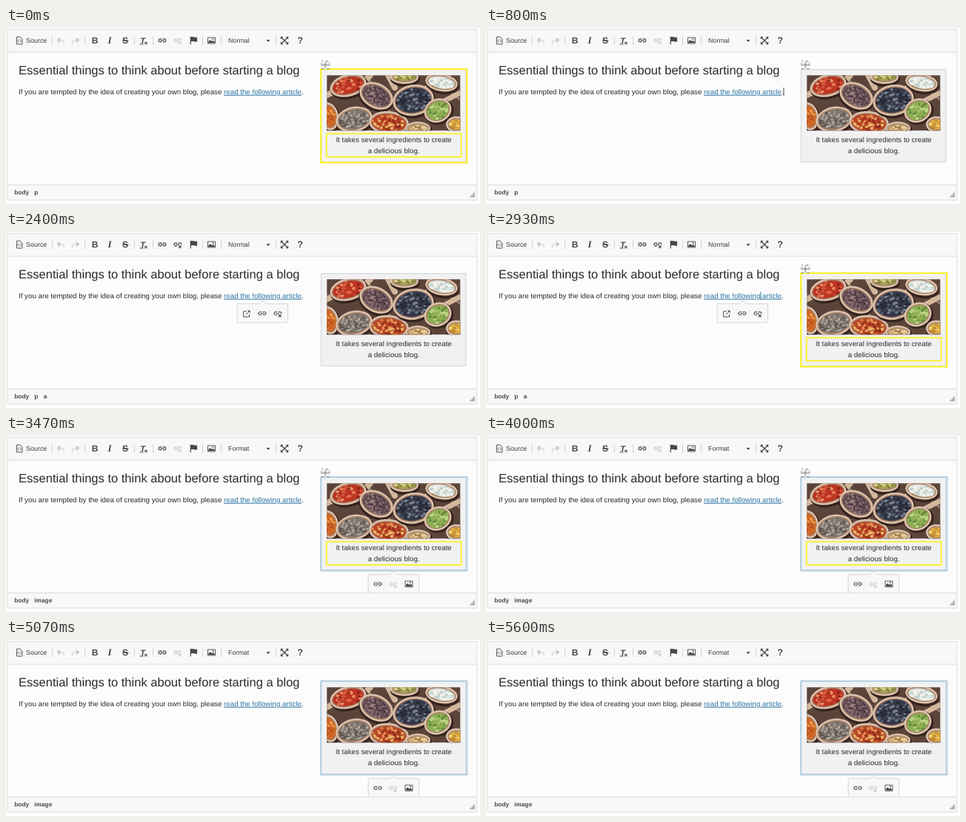
Write an HTML page that moves like this. It is 640 by 239 pixels and loops after 5670 ms.

```html
<!DOCTYPE html>
<html lang="en">
<head>
<meta charset="utf-8">
<title>Editor demo</title>
<style>
html, body { margin: 0; width: 100%; height: 100%; overflow: hidden; background: #fff; }
svg { display: block; width: 640px; height: 239px; }
text { font-family: "Liberation Sans", Arial, sans-serif; fill: #2b2b2d; text-rendering: geometricPrecision; white-space: pre; }
.title { font-size: 16.54px; }
.copy { font-size: 9.74px; }
.ui { font-size: 8.95px; fill: #3c3c3e; }
.path { font-size: 8.3px; font-weight: bold; fill: #484848; }
.link { fill: #2f78a3; text-decoration: underline; text-decoration-thickness: .8px; }
.mid { text-anchor: middle; }
.icon { color: #464648; }
.off { color: #c8c8ca; }
.line { fill: none; stroke: currentColor; stroke-width: 1.2; }
.thin { fill: none; stroke: currentColor; stroke-width: .9; }
.fill, .icon text { fill: currentColor; }
</style>
</head>
<body>
<svg viewBox="0 0 640 239">
  <defs>
    <clipPath id="photoClip"><path d="M433.3 64.3h180v75h-180z"/></clipPath>
    <g id="doc">
      <path class="thin" d="M-3.5-5H1.2L4-2.2V5H-3.5z"/>
      <path class="thin" d="M-.7-1.5L-2 .5-.7 2.5M1.2-1.5L2.5.5 1.2 2.5"/>
    </g>
    <g id="undo">
      <path class="fill" d="M-5.5-.5L-1-4.4V3.4z"/>
      <path class="line" d="M-1.5-.7C2-.9 4-.2 4.6 4"/>
    </g>
    <g id="chain">
      <path class="line" d="M-.8-2H-3a2 2 0 0 0 0 4H-.8M.8-2H3a2 2 0 0 1 0 4H.8M-2.4 0H2.4"/>
    </g>
    <g id="unlink">
      <path class="line" d="M-.8-2H-3a2 2 0 0 0 0 4H-.8M.8-2H3a2 2 0 0 1 1.8 2.2M-2.4 0H2"/>
      <path class="line" d="M1 1.4L4.6 5M4.6 1.4L1 5"/>
    </g>
    <g id="flag">
      <path class="fill" d="M-4.8-5.3h1.2v10.6h-1.2zM-3.6-4.8C-1.2-5.8 .4-3.6 4.6-4.6V1.4C1 2.4-.9.2-3.6 1.4z"/>
    </g>
    <g id="picture">
      <path class="thin" d="M-5-4H5V4H-5z"/>
      <path class="fill" d="M-4.2 3.2V1.6L-1.8-1 .5 1.2 2-.2 4.2 1.8V3.2z"/>
      <circle class="fill" cx="2" cy="-2" r=".9"/>
    </g>
    <g id="open">
      <path class="thin" d="M0-3.3H-4.3V4.3H3.5V.5"/>
      <path class="thin" d="M-1 1.2L3.8-3.8"/>
      <path class="fill" d="M1.2-4.6H4.6V-1.2z"/>
    </g>
    <g id="expand">
      <path class="line" d="M-4-4L4 4M4-4L-4 4"/>
      <path class="fill" d="M-5.2-5.2h3.6l-3.6 3.6zM5.2-5.2v3.6l-3.6-3.6zM-5.2 5.2v-3.6l3.6 3.6zM5.2 5.2h-3.6l3.6-3.6z"/>
    </g>
    <g id="bubble">
      <path d="M-34.2 4.5H-5L0-.2 5 4.5H34.2V30H-34.2z" fill="#f8f7f9" stroke="#d6d6d8"/>
    </g>
  </defs>

  <rect x="2" y="2" width="634" height="232" fill="#fdfcfd"/>
  <path fill="#f8f7f9" d="M2 2H636V33H2zM2 213H636V234H2z"/>

  <text class="title" x="17" y="63.2">Essential things to think about before starting a blog</text>
  <text class="copy" x="17" y="89.8">If you are tempted by the idea of creating your own blog, please <tspan class="link">read the following article</tspan>.</text>
  <path id="caret" d="M0 81V92"/>

  <rect x="425.5" y="56.5" width="195.5" height="125.5" fill="#f2f1f2" stroke="#d2d2d4"/>
  <g id="photo" clip-path="url(#photoClip)"></g>
  <text class="copy mid" x="523.6" y="154.8">It takes several ingredients to create</text>
  <text class="copy mid" x="523.6" y="169.8">a delicious blog.</text>
  <rect id="frame" x="425.2" y="55.8" width="197" height="127" fill="none" stroke-width="2.4"/>
  <rect id="captionFrame" x="432.7" y="143.5" width="182" height="31.5" fill="none" stroke="#f8f13c" stroke-width="2"/>
  <g id="handle" color="#6c6c6e">
    <path fill="#f4f4f4" d="M425.5 44.5h11v11h-11z"/>
    <path class="thin" stroke-dasharray="3.5 4" stroke-dashoffset="1.75" d="M426 45h10.5v10.5H426z"/>
    <path class="thin" d="M431.2 46V54.5M427 50.2H435.5"/>
  </g>

  <g id="linkBubble" class="icon">
    <use href="#bubble" x="346.3" y="93"/>
    <use href="#open" x="325" y="111"/>
    <use href="#chain" x="346" y="110.5"/>
    <use href="#unlink" x="367" y="110.5"/>
  </g>
  <g id="imageBubble" class="icon">
    <use href="#bubble" x="523.3" y="183.5"/>
    <use href="#chain" x="502" y="201"/>
    <use class="off" href="#unlink" x="523" y="201"/>
    <use href="#picture" x="544" y="201"/>
    <path fill="#f8f7f9" d="M487 213H560V218H487z"/>
  </g>

  <path fill="none" stroke="#d9d9db" d="M2 33H636M2 213H636M2 2H636V233.8H2z"/>
  <path fill="#b4b4b6" d="M633 222.5V230H625.5z"/>

  <g class="icon">
    <path stroke="#d4d4d6" d="M62.5 11V23M106.5 11V23M173.5 11V23M198.5 11V23M265.5 11V23M290.5 11V23M364.5 11V23"/>
    <use href="#doc" x="18" y="17"/>
    <use class="off" href="#undo" x="74" y="17"/>
    <use class="off" href="#undo" transform="translate(94 17) scale(-1 1)"/>
    <text class="mid" x="120" y="21.2" font-size="12" font-weight="bold">B</text>
    <text class="mid" x="140" y="21.2" font-size="13" font-weight="bold" font-style="italic" style="font-family:'Liberation Serif',serif">I</text>
    <text class="mid" x="161" y="21.2" font-size="12" font-weight="bold">S</text>
    <path class="line" d="M156.8 17.2H165.4"/>
    <text class="mid" x="184.5" y="20.5" font-size="11" font-weight="bold" font-style="italic">T</text>
    <path class="line" d="M180.5 22H185.5M187.2 18.8L190.6 22.2M190.6 18.8L187.2 22.2"/>
    <use href="#chain" x="211" y="16.8"/>
    <use id="toolbarUnlink" href="#unlink" x="232" y="16.8"/>
    <use href="#flag" x="253.5" y="17"/>
    <use href="#picture" x="277.5" y="17"/>
    <path class="fill" d="M351.5 16H356.5L354 19z"/>
    <use href="#expand" x="376" y="17"/>
    <text class="mid" x="397.3" y="21.4" font-size="12.5" font-weight="bold">?</text>
  </g>
  <text class="ui" x="27" y="20.2">Source</text>
  <text id="format" class="ui" x="300" y="20.2"></text>
  <text class="path" x="11.3" y="226.3">body</text>
  <text id="element" class="path" x="38.3" y="226.3"></text>
  <text id="child" class="path" x="50.8" y="226.3">a</text>
</svg>
<script>
const LOOP = 5670;
const LEAVE_IMAGE = 670, CLICK_LINK = 1400, ENTER_IMAGE = 2700;
const CLICK_IMAGE = 3400, LEAVE_CAPTION = 4535;
const BLINK = 530;
const $ = id => document.getElementById(id);
const show = (id, on) => $(id).setAttribute("visibility", on ? "visible" : "hidden");

function seeded(seed) {
  return () => (seed = (seed * 16807) % 2147483647) / 2147483647;
}

// A wooden spoon bowl heaped with small pieces in the given colours.
function spoon(x, y, rx, ry, turn, colors, size) {
  const random = seeded(x * 97 + y * 31);
  let art = `<g transform="translate(${x} ${y}) rotate(${turn})">` +
    `<ellipse cx="1" cy="2.5" rx="${rx + 1}" ry="${ry + 1}" fill="#35231d"/>` +
    `<ellipse rx="${rx}" ry="${ry}" fill="#dcc3ad"/>` +
    `<ellipse rx="${rx - 2.5}" ry="${ry - 2.5}" fill="#a57e66"/>` +
    `<ellipse rx="${rx - 4}" ry="${ry - 4}" fill="${colors[0]}"/>`;
  const count = Math.round(rx * ry / size / size / 1.2);
  for (let i = 0; i < count; i++) {
    const angle = random() * 2 * Math.PI, reach = Math.sqrt(random());
    const cx = Math.cos(angle) * reach * (rx - 5), cy = Math.sin(angle) * reach * (ry - 5);
    art += `<ellipse cx="${cx.toFixed(1)}" cy="${cy.toFixed(1)}" rx="${size}" ry="${size * .75}" fill="${colors[i % colors.length]}"/>`;
  }
  return art + "</g>";
}

function drawPhoto() {
  const stick = (d, width) => `<path d="${d}" stroke="#d5b79d" stroke-width="${width}" stroke-linecap="round"/>`;
  $("photo").innerHTML = `<path fill="#5b453b" d="M433 64h181v76H433z"/>` +
    `<path stroke="#94806f" stroke-width="3" d="M433 101L470 139M486 64L535 139M568 64L613 97"/>` +
    stick("M433 91L449 84", 8) + stick("M480 77L492 64", 8) +
    stick("M525 81L516 64", 8) + stick("M568 83L578 64", 8) + stick("M590 100L613 88", 7) +
    spoon(538, 67, 19, 9, 0, ["#a5a457", "#d8cf8d", "#87823f"], 1.8) +
    spoon(588, 74, 22, 12, 10, ["#dfe5df", "#f7faf6", "#c3cdc6"], 2.2) +
    spoon(462, 78, 25, 15, -15, ["#bd3423", "#df6440", "#96241b", "#e99268"], 2.4) +
    spoon(436, 120, 13, 19, -12, ["#cf6724", "#eb9a45", "#b64f20"], 2.2) +
    spoon(500, 92, 24, 17, 28, ["#6b5357", "#443640", "#a18485"], 1.4) +
    spoon(470, 124, 25, 17, -12, ["#817872", "#b6aca2", "#57504c"], 1.5) +
    spoon(517, 129, 27, 16, 5, ["#b74524", "#e58950", "#e5bd6f", "#942b1c"], 2) +
    spoon(556, 136, 17, 9, 0, ["#c8a56d", "#ead5a4", "#9f7a4d"], 1.7) +
    spoon(550, 98, 28, 21, -10, ["#343847", "#545c70", "#232632", "#7c8393"], 2.2) +
    spoon(583, 112, 19, 16, -25, ["#8eaf54", "#bbd382", "#698d3f"], 2.5) +
    spoon(608, 131, 14, 11, 0, ["#dfad43", "#f0d57a", "#c08735"], 2);
}

function caretVisible(t) {
  if (t < CLICK_LINK) return t >= BLINK && t < 2 * BLINK;
  return t < CLICK_IMAGE && Math.floor((t - CLICK_LINK) / BLINK) % 2 === 0;
}

function update(t) {
  const inLink = t >= CLICK_LINK && t < CLICK_IMAGE;
  const selected = t >= CLICK_IMAGE;
  const hovered = t < LEAVE_IMAGE || (t >= ENTER_IMAGE && !selected);
  const onCaption = hovered || (selected && t < LEAVE_CAPTION);

  show("caret", caretVisible(t));
  $("caret").setAttribute("transform", `translate(${inLink ? 371 : 402} 0)`);
  $("caret").setAttribute("stroke", inLink ? "#2f78a3" : "#444");
  show("frame", hovered || selected);
  $("frame").setAttribute("stroke", selected ? "#b9d3e3" : "#f8f13c");
  show("captionFrame", onCaption);
  show("handle", onCaption || t < CLICK_LINK);
  show("linkBubble", inLink);
  show("imageBubble", selected);
  $("toolbarUnlink").setAttribute("class", inLink ? "" : "off");
  $("format").textContent = selected ? "Format" : "Normal";
  $("element").textContent = selected ? "image" : "p";
  show("child", inLink);
}

const start = performance.now();
function tick() {
  update((performance.now() - start) % LOOP);
  requestAnimationFrame(tick);
}
drawPhoto();
tick();
</script>
</body>
</html>
```
